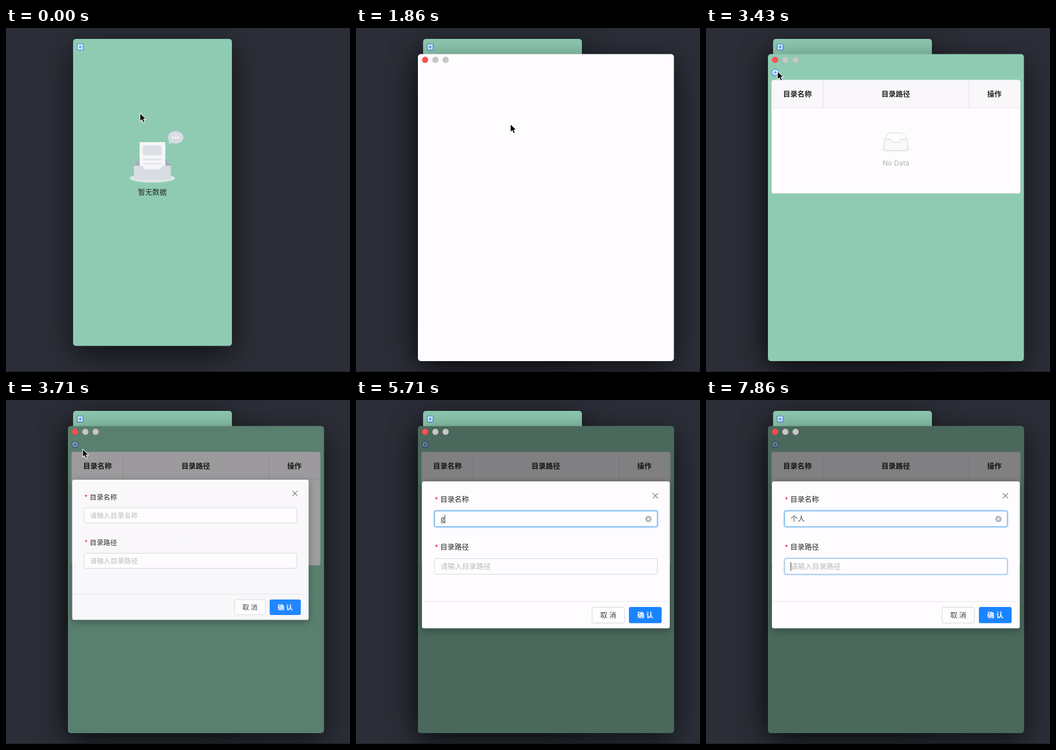
An HTML page with a canvas for the animation above (8000 ms loop, 600 by 600 pixels).

```html
<!DOCTYPE html>
<html lang="zh">
<head>
<meta charset="utf-8">
<style>
  html, body { margin: 0; width: 100%; height: 100%; overflow: hidden; background: #2b2e37; }
  canvas { display: block; }
</style>
</head>
<body>
<canvas id="stage" width="600" height="600"></canvas>
<script>
const ctx = document.getElementById('stage').getContext('2d');
const GREEN = '#8fcbb2', WHITE = '#fefcff', BLUE = '#1a84ff', INK = '#262626';
const FONT = "'Noto Sans CJK SC', 'Noto Sans CJK', 'Noto Sans', 'DejaVu Sans', sans-serif";
const STEPS_PER_MS = 0.007, STEPS = 56;

// Pointer stops: [step, x, y]
const POINTER = [
  [0, 234, 149], [4, 234, 149], [7, 269.5, 168], [14, 269.5, 168], [17, 183, 120],
  [21, 125, 76], [25, 125, 76], [26, 134, 86], [32, 134, 86], [36, 220, 203], [40, 220, 203]
];
// Text in the name field from each step on
const TYPED = [[40, 'g'], [41, 'ge'], [43, 'ge r'], [44, 'ge re'], [45, 'ge ren'], [52, '个人']];

function paint(fill, stroke, width = 1) {
  if (fill) { ctx.fillStyle = fill; ctx.fill(); }
  ctx.shadowColor = 'transparent';
  if (stroke) { ctx.strokeStyle = stroke; ctx.lineWidth = width; ctx.stroke(); }
}
function shadow(color, blur, dy) {
  ctx.shadowColor = color;
  ctx.shadowBlur = blur;
  ctx.shadowOffsetY = dy;
}
function box(x, y, right, bottom, radius, fill, stroke, width) {
  ctx.beginPath();
  ctx.roundRect(x, y, right - x, bottom - y, radius);
  paint(fill, stroke, width);
}
function oval(x, y, rx, ry, fill, stroke, width) {
  ctx.beginPath();
  ctx.ellipse(x, y, rx, ry, 0, 0, Math.PI * 2);
  paint(fill, stroke, width);
}
function shape(path, fill, stroke, width) {
  const p = new Path2D(path);
  if (fill) { ctx.fillStyle = fill; ctx.fill(p); }
  if (stroke) { ctx.strokeStyle = stroke; ctx.lineWidth = width || 1; ctx.stroke(p); }
}
// Text centred vertically on cy
function text(str, x, cy, { color = INK, align = 'left', weight = 400, size = 12.5, font = FONT } = {}) {
  ctx.font = `${weight} ${size}px ${font}`;
  ctx.textAlign = align;
  ctx.fillStyle = color;
  ctx.fillText(str, x, cy + size * 0.38);
  return ctx.measureText(str).width;
}
function pointerAt(step) {
  let i = 1;
  while (i < POINTER.length - 1 && POINTER[i][0] < step) i++;
  const [s0, x0, y0] = POINTER[i - 1], [s1, x1, y1] = POINTER[i];
  const p = Math.min(1, (step - s0) / (s1 - s0));
  const e = p * p * (3 - 2 * p);
  return [x0 + (x1 - x0) * e, y0 + (y1 - y0) * e];
}

function drawWindow(x, y, right, bottom, fill) {
  shadow('rgba(0,0,0,.6)', 52, 15);
  box(x, y, right, bottom, 5, fill);
}

function drawHome() {
  drawWindow(117, 19, 394, 554.5, GREEN);
  box(124.3, 28, 134.5, 38.3, 0.5, '#e4f3ff', '#3588ea', 1.2);
  shape('M126.5 33.2h5.8M129.4 30.3v5.8', null, '#3588ea', 1.2);

  oval(255.2, 262, 40, 7.5, '#dde9e3');
  shape('M223 240L233 228V241ZM288 240L278 228V241Z', '#a6aab8');
  box(233, 199, 278, 248, 2, '#f5f5f7');
  box(239, 205, 271, 222, 1, '#dce0e6');
  box(239, 228.3, 271, 230.4, 1, '#dce0e6');
  box(239, 236, 271, 238.1, 1, '#dce0e6');
  shape('M223 240H236Q238 240 239 242L240.5 245Q241 246.500 243 246.500H267.500Q269.500 246.500 270 245L271.500 242Q272.500 240 274.500 240H287.500V262Q287.500 264.500 285 264.500H225.500Q223 264.500 223 262Z', '#d8dce3');
  shape('M285 196L284 202L292 200Z', '#d8dce3');
  oval(296, 190.8, 13.5, 10.7, '#d8dce3');
  for (const x of [291, 296, 301]) oval(x, 191.3, 1.7, 1.7, '#fff');
  text('暂无数据', 255.3, 286.5, { align: 'center' });
}

function drawMenu(mx, my, alpha) {
  ctx.save();
  ctx.globalAlpha = alpha;
  shadow('rgba(0,0,0,.45)', 14, 5);
  box(235, 147, 362, 187.5, 4.5, '#cfe9dc', 'rgba(0,0,0,.12)', 0.5);
  box(235, 184, 362, 187.5, [0, 0, 4.5, 4.5], '#dedfdd');
  const row = mx <= 236 ? -1 : my >= 167 ? 1 : 0;
  if (row >= 0) box(235, 150 + row * 17, 362, 167 + row * 17, 0, '#2b80f0');
  [['检查元素', '^⌘J', 351], ['设置', '⌘,', 349]].forEach(([label, keys, right], i) => {
    const color = row === i ? '#fff' : '#111';
    text(label, 254, 158 + i * 17.3, { color });
    text(keys, right, 158 + i * 17.3, { color, align: 'right' });
  });
  ctx.restore();
}

function drawDirectories() {
  oval(120.5, 77.5, 5.7, 5.7, '#e4f3ff', '#3588ea', 1.2);
  shape('M117.600 77.500h5.800M120.500 74.600v5.800', null, '#3588ea', 1.2);

  box(114.5, 90.8, 548, 288.3, 3, WHITE, '#e2e4e3');
  box(115, 91.3, 547.5, 139, [3, 3, 0, 0], '#f9f7fa');
  shape('M115 139H547.500M204.300 91V139M458.700 91V139', null, '#e5e3e6');
  [['目录名称', 159.5], ['目录路径', 331], ['操作', 503]].forEach(([label, x]) =>
    text(label, x, 115.3, { align: 'center', weight: 600 }));

  oval(331.3, 211.5, 27, 5.5, '#f3f2f4');
  shape('M311 194L319 184Q320 183 321.500 183H341Q342.500 183 343.500 184L351.500 194V205H311Z', WHITE, '#d7d6d8');
  shape('M311 194H321Q323.500 194 323.500 196.500T326 199.500H336.500Q339 199.500 339 196.500T341.500 194H351.500V211Q351.500 213.500 349 213.500H313.500Q311 213.500 311 211Z', '#f9f8fa', '#d7d6d8');
  text('No Data', 331.3, 235, { color: '#b2b0b3', align: 'center', size: 12.2, font: 'Inter, sans-serif' });
}

function drawTrafficLights() {
  ['#fc5150', '#c8c6c8', '#c8c6c8'].forEach((color, i) =>
    oval(120.5 + i * 17.9, 55.5, 5.4, 5.4, color, 'rgba(0,0,0,.08)', 0.6));
}

function drawField(top, label, value, focus, caret, composing) {
  text('*', 137, top - 18.5, { color: '#f5222d', size: 14 });
  text(label, 147, top - 19.5);
  const y = top + 0.5, bottom = top + 28;
  if (focus > 0) box(136, y - 1, 526.5, bottom + 1, 4, null, `rgba(24,144,255,${0.22 * focus})`, 3);
  box(137, y, 525.5, bottom, 3, WHITE, '#d6d5d7');
  if (focus > 0) box(137, y, 525.5, bottom, 3, null, `rgba(64,160,245,${focus})`);
  const cy = top + 14.5;
  let width = 0;
  if (value) {
    width = text(value, 147.5, cy, { color: '#444' });
    oval(510, cy, 5.5, 5.5, '#b5b4b6');
    shape(`M508 ${cy - 2}l4 4m0 -4l-4 4`, null, '#fff', 1.1);
    if (composing) box(147.5, cy + 7, 147.5 + width, cy + 8, 0, '#555');
  } else {
    text('请输入' + label, 147.5, cy, { color: '#b9b8ba' });
  }
  if (caret) box(147.4 + width, cy - 7.5, 148.4 + width, cy + 7.5, 0, '#333');
}

function drawCandidates(step) {
  const words = step < 43 ? '个 各 歌 格 哥 隔 割 葛 革 阁 搁 戈' : '个人 各人 歌人 个 各 歌 格 哥 隔 割 葛';
  shadow('rgba(0,0,0,.3)', 12, 4);
  box(143, 225, step < 43 ? 574 : 594, 250, 4, '#f7f6f8', '#d2d1d3', 0.6);
  box(143, 225, step < 43 ? 177 : 189, 250, [4, 0, 0, 4], '#2b80f0');
  let x = 149;
  words.split(' ').forEach((word, i) => {
    const color = i ? INK : '#fff';
    text(String(i + 1), x, 237.5, { color: i ? '#999' : '#fff', size: 9 });
    x += 11 + text(word, x + 10, 237.5, { color }) + 12;
  });
}

function drawDialog(step, age) {
  box(108, 45.5, 554.5, 581, 5, `rgba(0,0,0,${0.485 * (1 - 0.227 ** age)})`);
  drawTrafficLights();
  const scale = 1 - 0.8 * 0.0577 ** age;
  ctx.save();
  ctx.globalAlpha = 1 - 0.03 ** age;
  ctx.translate(125.5, 77);
  ctx.scale(scale, scale);
  ctx.translate(-125.5, -77);

  shadow('rgba(0,0,0,.3)', 14, 4);
  box(115, 142, 547.3, 398.3, 3.5, WHITE);
  shape('M517.500 162.300l9.400 9.400m0 -9.400l-9.400 9.400', null, '#777', 1.2);

  const value = TYPED.reduce((last, [start, str]) => step >= start ? str : last, '');
  const moved = step >= 55;
  drawField(193, '目录名称', value, moved ? 0.9 : step >= 37 ? 1 : 0, step >= 37 && !moved, step > 40 && step < 52);
  drawField(276, '目录路径', '', moved ? 0.55 : 0, moved);

  shape('M115 351.500H547.300', null, '#e6e4e7');
  box(411.8, 361.3, 468.3, 389, 3, WHITE, '#d6d5d7');
  text('取 消', 440, 375.3, { align: 'center', color: '#444' });
  box(476, 361, 533, 389.3, 3, BLUE);
  text('确 认', 504.5, 375.3, { align: 'center', color: '#fff', weight: 600 });
  ctx.restore();
  if (step > 40 && step < 52) drawCandidates(step);
}

function drawPointer(x, y) {
  ctx.save();
  ctx.translate(x, y);
  ctx.lineJoin = 'round';
  shape('M0 0V13.500L3.200 10.600L5.500 15.700L7.800 14.700L5.600 9.700H9.700Z', '#000', '#fff', 1.6);
  shape('M0.300 0.800V12.800L3.300 10L5.700 15.200L7.300 14.400L5 9.300H9Z', '#000');
  ctx.restore();
}

function draw(step) {
  ctx.fillStyle = '#2b2e37';
  ctx.fillRect(0, 0, 600, 600);
  ctx.fillStyle = '#1b1d22';
  ctx.fillRect(0, 599, 600, 1);

  const [mx, my] = pointerAt(step);
  drawHome();
  if (step >= 3 && step < 10) drawMenu(mx, my, step < 9 ? 1 : 0.45);
  if (step >= 10) {
    const loaded = step >= 15;
    drawWindow(108, 45.5, 554.5, 581, loaded ? GREEN : WHITE);
    if (loaded) drawDirectories();
    drawTrafficLights();
    if (step > 25) drawDialog(step, step - 25);
  }
  if (step < 40) drawPointer(mx, my);
}

function tick() {
  const time = performance.now() % 8000;
  draw(Math.floor((time + 4.5) * STEPS_PER_MS) % STEPS);
  requestAnimationFrame(tick);
}
tick();
</script>
</body>
</html>
```
